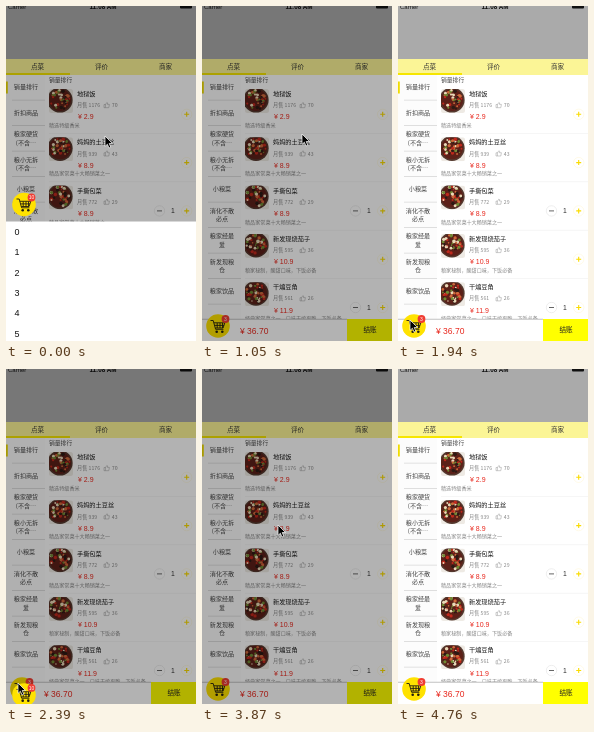
Write an HTML page that moves like this. It is 190 by 335 pixels and loops after 5030 ms.

```html
<!DOCTYPE html>
<html lang="zh-CN">
<head>
<meta charset="utf-8">
<style>
html, body { margin: 0; width: 100%; height: 100%; overflow: hidden; background: #fff; }
svg { display: block; width: 100%; height: 100%; }
text { font-family: "Noto Sans CJK SC", "Noto Sans CJK", sans-serif; }
.num { font-family: "Liberation Sans", Arial, sans-serif; }
</style>
</head>
<body>
<svg id="stage" viewBox="0 0 190 335"></svg>
<script>
const NS = 'http://www.w3.org/2000/svg';
const stage = document.getElementById('stage');

function add(parent, tag, attrs = {}, content) {
  const el = document.createElementNS(NS, tag);
  for (const key in attrs) el.setAttribute(key, attrs[key]);
  if (content !== undefined) el.textContent = content;
  parent.appendChild(el);
  return el;
}
const group = (parent, x = 0, y = 0) => add(parent, 'g', { transform: `translate(${x} ${y})` });
const rect = (p, x, y, width, height, fill, rx = 0) => add(p, 'rect', { x, y, width, height, fill, rx });
const disc = (p, cx, cy, r, fill, extra = {}) => add(p, 'circle', { cx, cy, r, fill, ...extra });
const path = (p, d, stroke, width = 0.7, fill = 'none') =>
  add(p, 'path', { d, stroke, 'stroke-width': width, fill });
const text = (p, x, y, size, fill, content, extra = {}) =>
  add(p, 'text', { x, y, 'font-size': size, fill, ...extra }, content);
const mid = { 'text-anchor': 'middle' };

function seeded(seed) {
  return () => (seed = (seed * 16807) % 2147483647) / 2147483647;
}

function drawHeader(p) {
  rect(p, 0, 0, 190, 53, '#aaa');
  text(p, 2, 2.6, 6, '#111', 'Carrier', { class: 'num' });
  text(p, 97, 2.6, 6.3, '#111', '11:08 AM', { class: 'num', 'font-weight': 700, ...mid });
  rect(p, 174, -2, 12, 4.4, '#111', 1);
  rect(p, 0, 53, 190, 16, '#fbf596');
  rect(p, 0, 67, 64, 2, '#f6e600');
  ['点菜', '评价', '商家'].forEach((label, i) => text(p, 31.5 + i * 64, 63.2, 6.6, '#333', label, mid));
}

const categories = [
  ['销量排行'], ['折扣商品'], ['粮家硬货', '(不含…'], ['粮小无拆', '(不含…'], ['小粮菜'],
  ['消化不散', '必点'], ['粮家经最', '爱'], ['新发现粮', '仓'], ['粮家饮品']
];

function drawSidebar(p) {
  rect(p, 0, 69, 39, 245, '#fcfcfc');
  rect(p, 0, 75.5, 1.8, 12, '#f0dc00');
  categories.forEach((lines, i) => {
    const y = 81.2 + i * 25.5;
    lines.forEach((line, n) =>
      text(p, 20, y + 2.2 + (n - (lines.length - 1) / 2) * 8.4, 6.1, '#444', line, mid));
    rect(p, 6, y + 12.6, 33, 0.6, '#ccc');
  });
}

const dishes = [
  ['地狱饭', 1176, 70, '2.9', '精选特级香米'],
  ['妈妈的土豆丝', 939, 43, '8.9', '精品家常菜十大畅销菜之一'],
  ['手撕包菜', 772, 29, '8.9', '精品家常菜十大畅销菜之一', 1],
  ['新发现烧茄子', 595, 36, '10.9', '粮家秘制，酸甜口味，下饭必备'],
  ['干煸豆角', 561, 26, '11.9', '经典家常菜之一，口味干煸爽脆，下饭必备', 1]
];

function drawBowl(p, seed) {
  const rand = seeded(seed);
  const g = add(p, 'g', { 'clip-path': 'url(#photo)' });
  rect(g, 0, 0, 24, 24, '#eeeae4');
  disc(g, 11, 11, 12.6, '#54382e');
  disc(g, 11, 11, 11, '#5c2018');
  const tones = ['#c0281c', '#2c1a14', '#cf6a3c', '#6f8a34', '#ead9b8'];
  for (let i = 0; i < 40; i++) {
    const a = rand() * 6.28, r = Math.sqrt(rand()) * 10;
    disc(g, 11 + r * Math.cos(a), 11 + r * Math.sin(a), 0.7 + rand() * 1.1, tones[i % 5]);
  }
}

function drawDish(p, [name, sold, likes, price, note, count], i) {
  const g = group(p, 43, 83 + i * 48.3);
  if (i) rect(g, 0, -4, 147, 0.5, '#ececec');
  drawBowl(g, 41 + i * 977);
  text(g, 28, 7, 6.2, '#111', name, { 'font-weight': 500 });
  text(g, 28, 18.3, 5.2, '#888', '月售 ' + sold);
  path(g, 'M55 15.5h1.4v3.2h-1.4zM56.4 15.7l1.4-2.2 .9.5-.3 1.4h2l-.6 3.3h-3.4', '#999', 0.5);
  text(g, 62.8, 18.3, 5.2, '#888', likes);
  text(g, 29, 30.4, 7, '#e8281e', '¥ ' + price, { class: 'num' });
  text(g, 0, 38.2, 5.1, '#888', note);
  disc(g, 137.7, 25.3, 5.2, '#fff', { stroke: '#fff4d0', 'stroke-width': 0.5 });
  path(g, 'M135.2 25.3h5M137.7 22.8v5', '#fadc00', 1.1);
  if (count) {
    disc(g, 110.5, 25.3, 5.2, '#fff', { stroke: '#ddd', 'stroke-width': 0.5 });
    path(g, 'M108 25.3h5', '#555', 0.9);
    text(g, 124, 27.7, 6.8, '#333', count, { class: 'num', ...mid });
  }
}

function drawCart(p, count) {
  const g = group(p, 16, 320);
  disc(g, 0, 0, 11.8, '#ffe200');
  path(g, 'M-7.5-5.5h2.7l2.4 8.8h7.8M-4.2-3.2h11l-1.7 5.2h-7.8M-3.4-.6h9.4M-.8-3v5M2-3v5M4.5-3v5', '#201c10', 0.9);
  disc(g, -1.3, 5.7, 1.3, '#201c10');
  disc(g, 4.3, 5.7, 1.3, '#201c10');
  disc(g, 7.5, -7, 3.9, '#f03c32');
  text(g, 7.5, -5.2, 5, '#fff', count, { class: 'num', ...mid });
  return g;
}

function drawBar(p) {
  rect(p, 0, 313, 190, 22, '#fff');
  rect(p, 0, 312.8, 145, 0.8, '#b4b4b4');
  rect(p, 145, 313, 45, 22, '#ff0');
  text(p, 38, 327.6, 8.5, '#e8281e', '¥ 36.70', { class: 'num' });
  text(p, 168, 326.4, 6.6, '#222', '结账', mid);
  drawCart(p, 3);
}

const clip = add(add(stage, 'defs'), 'clipPath', { id: 'photo' });
rect(clip, 0, 0, 24, 24, '#000', 2.5);

const page = group(stage);
rect(page, 0, 0, 190, 335, '#fff');
drawHeader(page);
drawSidebar(page);
text(page, 43, 76, 5.8, '#444', '销量排行');
dishes.forEach((dish, i) => drawDish(page, dish, i));
drawBar(page);

const shade = rect(stage, 0, 0, 190, 335, '#000');
const sheet = group(stage);
rect(sheet, 0, 0, 190, 128, '#fff');
for (let i = 0; i < 6; i++) text(sheet, 8.5, 13.2 + i * 20.4, 9, '#111', i, { class: 'num' });
move(drawCart(sheet, 10), 18, -17);

const cursor = group(stage);
path(cursor, 'M0 0V10.4L2.4 8.2 4 12 5.8 11.2 4.2 7.5H7.5Z', '#fff', 0.7, '#000');

// The picture only refreshes at these moments.
const ticks = [0, 150, 600, 750, 900, 1050, 1200, 1350, 1500, 1650, 1800, 1940, 2390,
  2540, 2690, 2830, 2980, 3120, 3570, 3720, 3870, 4020, 4320, 4470, 4610, 4760];
const LOOP = 5030;

const open = [[0, 1], [680, 1], [1050, 0], [2385, 0], [2800, 1], [3500, 1], [3870, 0]];
const pointer = [[0, 99, 130], [150, 100, 129], [1050, 100, 128], [1500, 31, 273], [1600, 31, 273],
  [1940, 12, 314], [2540, 12, 314], [3120, 76, 156], [4200, 76, 156], [4760, 191, 336]];
const shaded = t => t < 1200 || (t >= 2390 && t < 4020);

const smooth = k => k * k * (3 - 2 * k);

function sample(track, t, col = 1) {
  const n = track.findIndex(key => key[0] > t);
  if (n < 0) return track[track.length - 1][col];
  const a = track[n - 1], b = track[n];
  return a[col] + (b[col] - a[col]) * smooth((t - a[0]) / (b[0] - a[0]));
}

function move(el, x, y) {
  el.setAttribute('transform', `translate(${x} ${y})`);
}

function render(now) {
  const time = now % LOOP;
  const t = ticks.filter(tick => tick <= time).pop();
  const k = sample(open, t);
  move(sheet, 0, 343 - 127.5 * k);
  sheet.style.display = k > 0 ? '' : 'none';
  shade.setAttribute('opacity', shaded(t) ? 0.3 : 0);
  move(cursor, sample(pointer, t), sample(pointer, t, 2));
}

const start = performance.now();
function loop() {
  render(performance.now() - start);
  requestAnimationFrame(loop);
}
loop();
</script>
</body>
</html>
```
